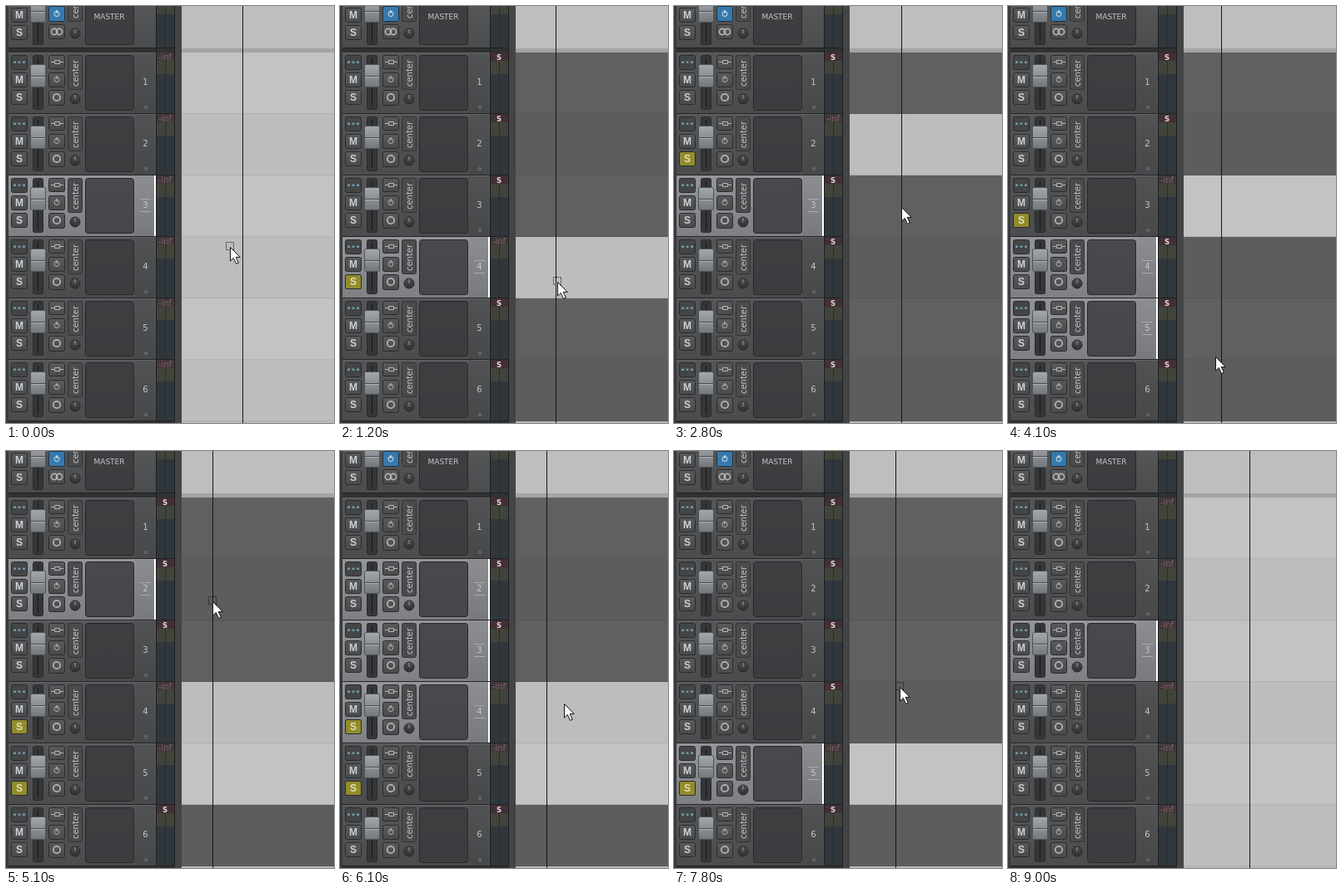
These frames come from a looping animation (394x502 px, 9700 ms). An HTML page:

```html
<!DOCTYPE html>
<html lang="en">
<head>
<meta charset="utf-8">
<title>Track solo</title>
<style>
  html, body { margin: 0; width: 100%; height: 100%; overflow: hidden; background: #38393b; }
  svg { display: block; }
  text { font: 10px "DejaVu Sans", Verdana, sans-serif; fill: #c4c6c8; text-anchor: middle; }
  .cap { font: bold 12px "Liberation Sans", Arial, sans-serif; fill: #cfd1d3; }
  .lamp { fill: #e0e0b4; }
  .master { font-size: 9px; }
  .inf { fill: #7d6366; }
  .flag { font-size: 8.5px; font-weight: bold; fill: #e4dadc; }
  .lit, .armed, .mute { display: none; }
  .sel .lit, .solo .armed, .muted .mute { display: block; }
  .muted .inf { display: none; }
</style>
</head>
<body>
<svg id="stage" width="394" height="502" viewBox="0 0 394 502"></svg>
<script>
const LOOP = 9700, STEP = 100, GLIDE = 400, TOP = 56, ROW = 74;
const HOME = { x: 270, y: 290, line: 284, pick: 0, tracks: "3" };

// Each action: glide to x, y, pick tracks, put the edit line, then solo the pick.
const actions = [
  { go: 0, x: 262, y: 332, pick: 900, tracks: "4", line: 259, solo: 1100 },
  { go: 1300, x: 272, y: 166, pick: 1900, tracks: "2", line: 271, solo: 2100 },
  { go: 2200, x: 274, y: 242, pick: 2700, tracks: "3", line: 273, solo: 3000 },
  { go: 2800, x: 257, y: 312, pick: 3200, tracks: "4", line: 256 },
  { go: 3200, x: 250, y: 422, pick: 3800, tracks: "45", solo: 4200 },
  { go: 4400, x: 249, y: 181, pick: 5100, tracks: "2", line: 248 },
  { go: 5300, x: 270, y: 304, pick: 5900, tracks: "234", solo: 6200 },
  { go: 6400, x: 270, y: 390, pick: 7000, tracks: "5", line: 266, solo: 7400 },
  { go: 7500, x: 291, y: 264, pick: 8000, tracks: "3", line: 290, clear: 8200 },
  { go: 8300, x: 368, y: 318 },
  { go: 8600, x: 105, y: 530 }
];

const fill = (x, y, w, h, c, more = "") =>
  `<rect x="${x}" y="${y}" width="${w}" height="${h}" fill="${c}" ${more}/>`;
const box = (x, y, w, h, c = "url(#btn)", r = 2, edge = "#2a2b2d") =>
  fill(x + .5, y + .5, w - 1, h - 1, c, `rx="${r}" stroke="${edge}"`);
const ring = (x, y, r, c, w = 1, inner = "none") =>
  `<circle cx="${x}" cy="${y}" r="${r}" fill="${inner}" stroke="${c}" stroke-width="${w}"/>`;
const stroke = (d, c, w = 1) =>
  `<path d="${d}" fill="none" stroke="${c}" stroke-width="${w}"/>`;
const label = (x, y, s, cls = "") => `<text x="${x}" y="${y}" class="${cls}">${s}</text>`;
const group = (cls, s) => `<g class="${cls}">${s}</g>`;

const button = (y, s, c, cls = "cap") => box(6, y - 8, 20, 18, c) + label(16, y + 5, s, cls);
const power = (y, c) => ring(61, y + .5, 3, c) + stroke(`M61 ${y - 4}v4`, c, 1.3);
const knob = y => ring(83, y, 6, "#27282a", 1, "url(#knob)") +
  stroke(`M83 ${y - 5}v5`, "#9a9c9e");
const fader = y => box(32, y - 25, 13, 66, "#343638") +
  fill(38, y - 21, 1, 58, "#17181a") +
  box(29, y - 14, 19, 28, "url(#cap)", 2, "#505357") +
  fill(30, y, 17, 1, "#46494d") + fill(30, y + 1, 17, 1, "#b0b3b7");
const pan = y => box(74, y, 18, 42, "#494b4d", 2, "#313335") +
  `<text transform="translate(86.5 ${y + 22}) rotate(-90)">center</text>`;
const effects = y => fill(95.5, y + .5, 58, 66, "#393a3c",
  'fill-opacity=".82" rx="3" stroke="#27282a"');

const meter = (h, top) => fill(181, 0, 21, h, "#30373c") +
  fill(181, 0, 21, top, "#41443a") + fill(191, 0, 1, h, "#272d31");

function track(n) {
  const shade = n % 2 ? ["#c3c3c5", "#606062"] : ["#bdbdbf", "#5d5d5f"];
  return `<g class="track" transform="translate(0 ${TOP + ROW * (n - 1)})">` +
    fill(3, 0, 177, 73, "url(#panel)") + fill(3, 0, 177, 1, "#626467") +
    fill(3, 0, 177, 73, "url(#lit)", 'class="lit"') +
    fill(155, 1, 23, 72, "#000", 'opacity=".05"') +
    fill(3, 73, 177, 1, "#232426") +
    box(6, 3, 20, 18, "#434547") +
    [0, 1, 2].map(i => fill(9 + i * 5.5, 10.5, 3, 2.4, "#749aaa")).join("") +
    button(32, "M") + button(53, "S") +
    group("armed", button(53, "S", "#918c2c", "cap lamp")) +
    fader(28) +
    box(51, 3, 20, 17) + stroke("M54 11.5h4M65 11.5h4M58.5 9.5h6v4h-6z", "#b5b7b9") +
    box(51, 24, 20, 18) + power(32, "#b0b2b4") +
    box(51, 45, 20, 19) + ring(61, 54, 4.2, "#b2b4b6", 1.8) +
    pan(3) + knob(56) + effects(3) +
    group("lit", stroke("M161 28.5h13M161 43.5h13", "#a9abae") + fill(178, 0, 2, 73, "#fff")) +
    label(167.5, 39, n) + ring(168, 66, 1.5, "#77797b") +
    meter(73, 26) + fill(181, 0, 21, 10, "#42373a") + label(191, 9, "-inf", "inf") +
    group("mute", fill(181, 0, 21, 10, "#432f35") + label(191, 9, "S", "flag")) +
    fill(181, 73, 22, 1, "#202224") +
    fill(211, 0, 183, ROW, shade[0]) +
    fill(211, 0, 183, ROW, shade[1], 'class="mute"') +
    fill(211, 73, 183, 1, "#000", 'opacity=".08"') + "</g>";
}

const master = () =>
  fill(3, 0, 177, 50, "url(#panel)") +
  button(10, "M") + button(31, "S") + fader(6) +
  box(51, 0, 20, 19, "#3779ad", 2, "#1f3344") + power(9, "#d3e6f2") +
  box(51, 22, 20, 18) +
  [58, 64].map(x => ring(x, 31, 3.6, "#b5b7b9", 1.6)).join("") +
  pan(-23) + knob(33) + effects(-20) +
  label(124, 16, "MASTER", "master") + meter(50, 10) +
  fill(3, 50, 200, 1, "#1f2022") + fill(3, 51, 200, 5, "#303133") +
  fill(211, 0, 183, 51, "#bebec0") + fill(211, 51, 183, 5, "#a4a4a6");

const grad = (id, a, b) => `<linearGradient id="${id}" x2="0" y2="1">` +
  `<stop stop-color="${a}"/><stop offset="1" stop-color="${b}"/></linearGradient>`;

const stage = document.getElementById("stage");
stage.innerHTML = "<defs>" + grad("panel", "#545658", "#4a4c4e") +
  grad("lit", "#939599", "#7e8084") + grad("btn", "#585a5c", "#484a4c") +
  grad("cap", "#a4a7ab", "#74777b") + grad("knob", "#4c4e50", "#2e3032") + "</defs>" +
  fill(0, 0, 394, 502, "#38393b") + fill(203, 0, 8, 502, "#434446") +
  master() + [1, 2, 3, 4, 5, 6].map(track).join("") +
  fill(180, 0, 1, 502, "#1d1e20") + fill(202, 0, 1, 502, "#1d1e20") +
  fill(3, 500, 200, 2, "#303133") + fill(211, 500, 183, 2, "#b9b9bb") +
  fill(0, 0, 1, 502, "#161616", 'id="line"') +
  `<g id="mouse">` + fill(-5.5, -5.5, 9, 9, "none", `id="dots" stroke="#111" ` +
  `stroke-dasharray="1 1" stroke-dashoffset=".5" shape-rendering="crispEdges"`) +
  `<path d="M-.5 .5V17l3.8-3.6 3.2 7 2.8-1.2-3.1-6.8h5z" fill="#fff" stroke="#111"/></g>`;

const get = id => document.getElementById(id);
const rows = [...document.querySelectorAll(".track")];
const line = get("line"), mouse = get("mouse"), dots = get("dots");

const ease = k => k * k * (3 - 2 * k);

function place(t) {
  const i = actions.findLastIndex(a => a.go <= t);
  const to = actions[i], from = actions[i - 1] || HOME;
  const k = Math.min(1, (t - to.go) / GLIDE);
  const dy = to.y - from.y;
  const swing = Math.min(0, dy) * .18 * Math.sin(Math.PI * k); // upward moves bow left
  return [from.x + (to.x - from.x) * ease(k) + swing, from.y + dy * ease(k)].map(Math.round);
}

function draw(now) {
  const t = Math.floor(now % LOOP / STEP) * STEP;
  const last = key => actions.findLast(a => a[key] <= t);
  const picked = last("pick") || HOME, keyed = last("solo");
  const solo = !keyed || last("clear") ? "" : keyed.tracks;
  const set = [HOME, ...actions].findLast(a => a.line && a.pick <= t);
  const waiting = picked !== HOME && t < (picked.solo || picked.clear || 0);

  rows.forEach((row, i) => {
    const n = String(i + 1), alone = solo.includes(n);
    row.classList.toggle("sel", picked.tracks.includes(n));
    row.classList.toggle("solo", alone);
    row.classList.toggle("muted", solo !== "" && !alone);
  });
  line.setAttribute("x", set.line);
  mouse.setAttribute("transform", `translate(${place(t)})`);
  dots.style.display = waiting ? "none" : "";
}

const start = performance.now();
function tick() {
  draw(performance.now() - start);
  requestAnimationFrame(tick);
}
tick();
</script>
</body>
</html>
```
